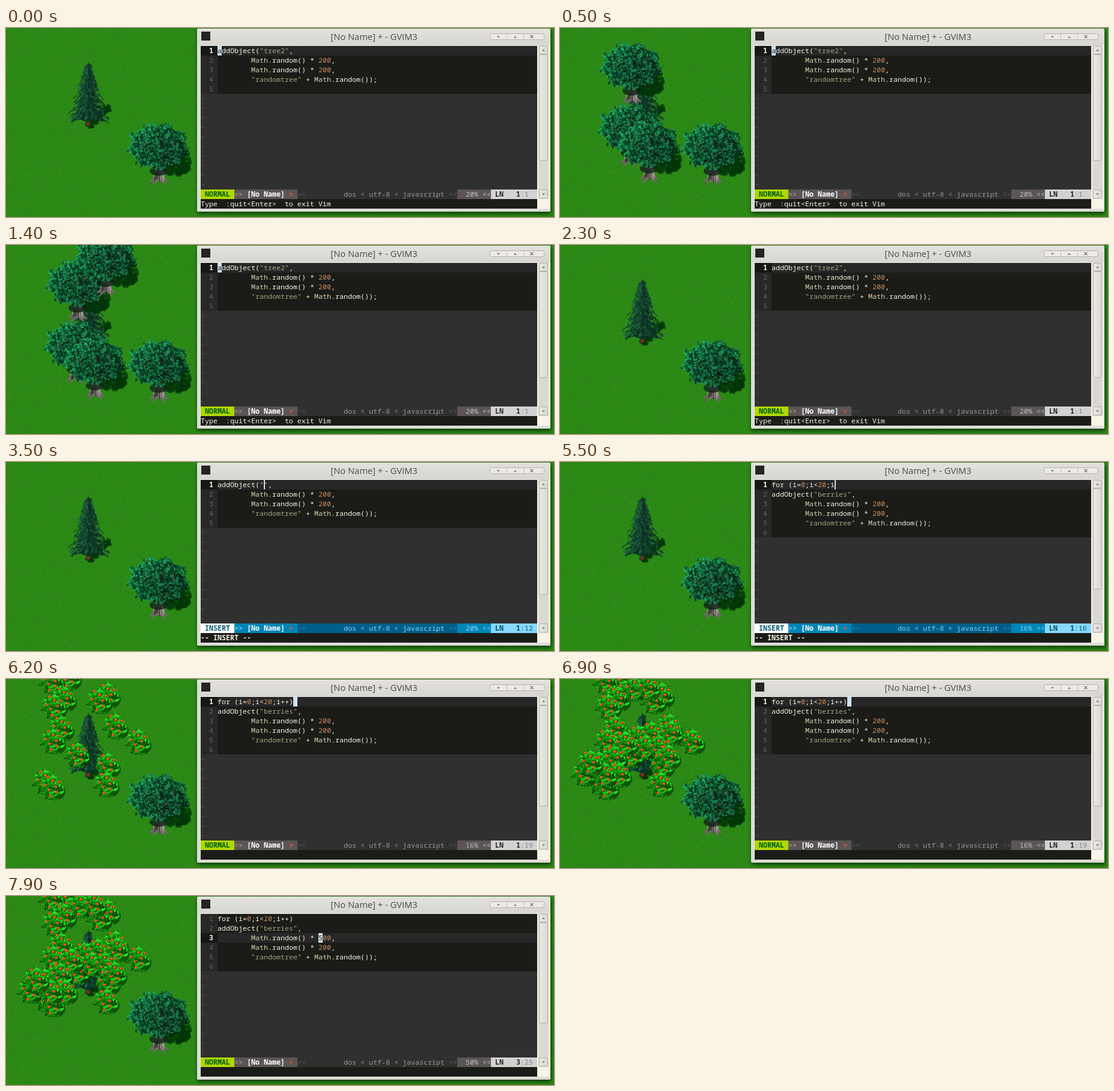
An HTML page with a canvas for the animation above (8 s loop, 912 px wide and 316 px high).

```html
<!DOCTYPE html>
<html lang="en">
<head>
<meta charset="utf-8">
<title>Live code editing</title>
<style>
  html, body { margin: 0; width: 100%; height: 100%; overflow: hidden; background: #2b8413; }
  canvas, svg { position: absolute; left: 0; top: 0; display: block; }
  .code text { font: 11.667px "Noto Sans Mono", monospace; white-space: pre; }
  .code .b { font-weight: 700; }
  .title { font: 14.7px "Open Sans", sans-serif; }
</style>
</head>
<body>
<canvas id="field" width="912" height="316"></canvas>
<svg id="win" width="912" height="316" viewBox="0 0 912 316">
  <defs>
    <filter id="shade" x="-5%" y="-5%" width="110%" height="112%">
      <feDropShadow dx="1" dy="3" stdDeviation="3" flood-color="#001800" flood-opacity=".7"/>
    </filter>
    <linearGradient id="bar" x2="0" y2="1">
      <stop offset="0" stop-color="#e3e1dc"/><stop offset="1" stop-color="#d8d6d0"/>
    </linearGradient>
    <linearGradient id="thumb">
      <stop offset="0" stop-color="#ebe9e5"/><stop offset="1" stop-color="#dcd9d3"/>
    </linearGradient>
  </defs>
  <rect x="318" y="1" width="588" height="306" rx="2" fill="#dcdad5" filter="url(#shade)"/>
  <rect x="318.5" y="1.5" width="587" height="305" rx="2" fill="none" stroke="#e9e8e4"/>
  <rect x="319" y="2" width="586" height="26" fill="url(#bar)"/>
  <rect x="325" y="6" width="15" height="15" fill="#242424"/>
  <text class="title" x="612.5" y="20" text-anchor="middle" fill="#4a4a48">[No Name] + - GVIM3</text>
  <rect x="805.5" y="9.5" width="90" height="10" rx="2" fill="#eceae6" stroke="#b5b2aa"/>
  <path d="M833.5 10v9M861.5 10v9" stroke="#c2bfb8"/>
  <path d="M817 13.500h5l-2.500 3zM845 16.500h5l-2.500-3z" fill="#777"/>
  <path d="M872.500 12l5 5m0-5l-5 5" stroke="#777" stroke-width="1.200"/>
  <rect x="323" y="29" width="582" height="274" fill="#e6e4df"/>
  <rect x="884" y="29" width="20" height="273" fill="#f8f5e6"/>
  <rect x="886" y="29" width="17" height="257" fill="#dad8d2"/>
  <g fill="url(#thumb)" stroke="#b3b0a9">
    <rect x="887.500" y="30.500" width="14" height="13" rx="1"/>
    <rect id="grip" x="887.500" y="44.500" width="14" height="177" rx="1"/>
    <rect x="887.500" y="270.500" width="14" height="14" rx="1"/>
  </g>
  <path d="M892 38.500h5l-2.500-3zM892 276.500h5l-2.500 3z" fill="#777"/>
  <g id="view" class="code"></g>
</svg>
<script>
const LOOP = 8000, LEFT = 352, TOP = 30, CW = 7, RH = 16;
const FOR = 'for (i=0;i<20;i++) ';

/* ---------- scenery ---------- */
function seeded(seed) {
  return () => {
    seed = seed + 0x6D2B79F5 | 0;
    let n = Math.imul(seed ^ seed >>> 15, 1 | seed);
    n = n + Math.imul(n ^ n >>> 7, 61 | n) ^ n;
    return ((n ^ n >>> 14) >>> 0) / 4294967296;
  };
}

function sprite(w, h, paint) {
  const cv = document.createElement('canvas');
  cv.width = w; cv.height = h;
  paint(cv.getContext('2d'), w, h);
  return cv;
}

function blob(c, x, y, rx, ry, fill, turn = 0) {
  c.fillStyle = fill;
  c.beginPath();
  c.ellipse(x, y, rx, ry, turn, 0, 7);
  c.fill();
}

function trace(c, pts) {
  c.beginPath();
  pts.forEach(([x, y]) => c.lineTo(x, y));
}

function line(c, pts, color, width) {
  c.strokeStyle = color;
  c.lineWidth = width;
  trace(c, pts);
  c.stroke();
}

function shape(c, pts, color) {
  c.fillStyle = color;
  trace(c, pts);
  c.fill();
}

const grass = sprite(912, 316, (c, w, h) => {
  const rnd = seeded(4);
  c.fillStyle = '#2c8916';
  c.fillRect(0, 0, w, h);
  for (let i = 0; i < 60000; i++) {
    c.fillStyle = `hsla(${106 + rnd() * 6},73%,${25 + rnd() * 11}%,.5)`;
    c.fillRect(rnd() * w | 0, rnd() * h | 0, 1 + rnd() * 2 | 0, 1);
  }
});

const fir = sprite(84, 112, c => {
  const rnd = seeded(11);
  for (let i = 0; i < 90; i++) {
    const k = rnd();
    blob(c, 42 + k * 34 - rnd() * 8, 104 - k * 32 + rnd() * 10, 4, 2.5, 'rgba(3,56,8,.8)', .5);
  }
  line(c, [[39, 95], [39, 107]], '#7c2a2c', 6);
  for (let i = 0; i < 9; i++) {
    const y = 6 + i * 10, r = 5 + i * 3.6;
    shape(c, [[39, y - 6], [39 + r * .6, y + 6], [39 + r * .9, y + 15], [39 + r * .4, y + 11], [39, y + 16],
      [39 - r * .4, y + 11], [39 - r * .9, y + 15], [39 - r * .6, y + 6]], '#0a3423');
  }
  for (let y = 4; y < 94; y += 1.5) {
    const reach = 2 + y * .4 * (.65 + .35 * (y % 11) / 11);
    for (let i = 0; i < 9; i++) {
      const side = rnd() < .5 ? -1 : 1, a = rnd() * reach, x = 39 + side * a;
      const l = 9 + rnd() * 17 + (side < 0 ? 4 : 0), drop = y + a * .22;
      line(c, [[x, drop], [x + side * (1 + rnd() * 3), drop + 2 + rnd() * 4]],
        `hsl(${146 + rnd() * 12},${42 + rnd() * 16}%,${l}%)`, 1.3);
    }
  }
});

const oak = sprite(114, 114, c => {
  const rnd = seeded(23);
  for (let i = 0; i < 160; i++) {
    const a = rnd() * 6.3, r = Math.sqrt(rnd());
    blob(c, 81 + Math.cos(a) * r * 26, 68 + Math.sin(a) * r * 22, 4, 3, 'rgba(3,54,8,.75)', a);
  }
  shape(c, [[45, 76], [62, 76], [63, 94], [70, 102], [62, 101], [66, 109], [57, 102], [53, 99], [49, 102],
    [41, 109], [45, 100], [36, 102], [46, 92]], '#6f6863');
  for (let i = 0; i < 16; i++) {
    const x = 46 + rnd() * 15, lean = (x - 53.5) * .35;
    line(c, [[x, 84 + rnd() * 6], [x + lean, 93 + rnd() * 9]], rnd() < .5 ? '#aaa39c' : '#38322f', 1.2);
  }
  blob(c, 53, 83, 15, 8, 'rgba(12,30,20,.75)');
  blob(c, 52, 42, 45, 34, '#08351f');
  for (let i = 0; i < 850; i++) {
    const a = rnd() * 6.3, r = Math.sqrt(rnd()) * (1 + .07 * Math.sin(a * 9));
    const dx = Math.cos(a) * r, dy = Math.sin(a) * r;
    const l = 20 - dx * 5 - dy * 4 + r * 4 + (rnd() - .5) * 30;
    blob(c, 52 + dx * 49, 42 + dy * 38, 2.7, 1.3,
      `hsl(${144 + rnd() * 10},${58 + rnd() * 18}%,${Math.max(7, l)}%)`, rnd() * 3);
    if (i % 40 === 0) {
      const x = 52 + dx * 30, y = 42 + dy * 25;
      line(c, [[x, y], [x + 3, y + 3], [x + 3, y + 7]], '#504843', 1.4);
    }
  }
});

const bush = sprite(50, 54, c => {
  const rnd = seeded(37);
  blob(c, 27, 32, 17, 15, 'rgba(5,62,8,.7)');
  blob(c, 22, 25, 15, 17, '#0b5a0e');
  for (let i = 0; i < 190; i++) {
    const a = rnd() * 6.3, r = Math.sqrt(rnd()) * (1 + .14 * Math.sin(a * 7));
    const dy = Math.sin(a) * r;
    blob(c, 22 + Math.cos(a) * r * 18, 25 + dy * 20, 2.9, 1.1,
      `hsl(${113 + rnd() * 10},${72 + rnd() * 16}%,${34 - dy * 5 + (rnd() - .5) * 42}%)`, rnd() * 3);
  }
  for (let i = 0; i < 8; i++) {
    const a = i * 2.4, r = 6 + i * 1.4;
    const x = 22 + Math.cos(a) * r, y = 24 + Math.sin(a) * r * 1.1;
    blob(c, x, y, 2.5, 2.3, '#dc3a12');
    blob(c, x - .5, y - .6, 1.2, 1, '#ff7d4a');
  }
});

// trunk feet of the oaks, centres of the bushes, in planting order
const OAKS = [[119, 131], [116, 234], [148, 261], [166, 88]];
const BUSHES = [
  [104, -3], [76, 4], [169, 27], [155, 37], [96, 33], [80, 46], [182, 79], [220, 105],
  [92, 82], [78, 104], [119, 127], [169, 144], [167, 176], [65, 172], [77, 181],
  [124, 16], [146, 14], [130, 98], [152, 92], [184, 90], [142, 114], [164, 114],
  [180, 130], [108, 108], [64, 142], [40, 158], [90, 132], [98, 160], [74, 160], [50, 140]
];

const field = document.getElementById('field').getContext('2d');
let planted = '';
function drawField(oaks, bushes) {
  const key = oaks + '/' + bushes;
  if (key === planted) return;
  planted = key;
  const plantOak = (x, y) => field.drawImage(oak, x - 53, y - 109);
  field.drawImage(grass, 0, 0);
  field.drawImage(fir, 98, 56);
  plantOak(254, 265);
  OAKS.slice(0, oaks).forEach(p => plantOak(...p));
  BUSHES.slice(0, bushes).forEach(([x, y]) => field.drawImage(bush, x - 22, y - 25));
}

/* ---------- editing session ---------- */
const START = {
  insert: false, row: 1, col: 1, name: 'tree2', loop: -1, count: '200',
  keys: '', msg: 'Type  :quit<Enter>  to exit Vim', cursor: true, oaks: 0, bushes: 0
};
const steps = [
  [100, { keys: ',' }], [200, { keys: '', oaks: 1 }], [300, { keys: ',' }],
  [400, { keys: '', oaks: 2 }], [500, { oaks: 3 }], [800, { oaks: 4 }],
  [1100, { keys: ',' }], [1300, { keys: ',r' }], [1400, { keys: '' }],
  [1600, { keys: ',' }], [1700, { keys: ',r' }], [1800, { keys: '', oaks: 0 }],
  [2300, { cursor: false }], [2400, { cursor: true }],
  [2500, { col: 10 }], [2700, { col: 11 }], [2800, { col: 12 }],
  [3100, { keys: 'c' }], [3200, { keys: 'ci' }],
  [3300, { keys: '', insert: true, name: '', msg: '-- INSERT --' }],
  [3400, { cursor: false }], [3500, { cursor: true }],
  ...[2, 4, 5, 7].map((n, i) => [3600 + i * 100, { name: 'berries'.slice(0, n), col: 12 + n }]),
  [4000, { insert: false, col: 18, msg: '' }],
  [4100, { insert: true, col: 1, loop: 0, msg: '-- INSERT --' }],
  ...[[4200, 3], [4300, 5], [4500, 6], [4600, 7], [4700, 9], [4800, 10], [5000, 11], [5100, 12],
    [5400, 14], [5500, 15], [5600, 17], [5700, 18], [5800, 19]]
    .map(([ms, n]) => [ms, { loop: n, col: n + 1 }]),
  [5900, { insert: false, col: 19, msg: '' }], [6000, { keys: ',' }],
  [6100, { keys: '', bushes: 8 }], [6200, { bushes: 15 }],
  [6400, { bushes: 20, cursor: false }], [6500, { bushes: 25 }],
  [6600, { bushes: 30, cursor: true }],
  [6800, { cursor: false }], [6900, { cursor: true }],
  [7300, { row: 2 }], [7400, { row: 3 }], [7500, { col: 20 }], [7600, { col: 23 }],
  [7700, { col: 25 }], [7800, { keys: 'r' }], [7900, { keys: '', count: '500' }]
];

function stateAt(t) {
  const s = { ...START };
  for (const [ms, change] of steps) if (ms <= t) Object.assign(s, change);
  return s;
}

/* ---------- editor ---------- */
const esc = s => s.replace(/&/g, '&amp;').replace(/</g, '&lt;').replace(/>/g, '&gt;');
const box = (x, y, w, h, fill) => `<rect x="${x}" y="${y}" width="${w}" height="${h}" fill="${fill}"/>`;
const text = (x, y, s, fill, bold) =>
  `<text x="${x}" y="${y + 12}" fill="${fill}"${bold ? ' class="b"' : ''}>${esc(s)}</text>`;

function highlight(s, y) {
  let out = '';
  for (const m of s.matchAll(/"[^"]*"|Math|\d+|[^"\dM ]+/g)) {
    const k = m[0];
    const fill = k[0] === '"' ? '#a0a47e' : k === 'Math' ? '#d6d2ad' : /\d/.test(k) ? '#c58b5d' : '#f6f3e0';
    out += text(LEFT + m.index * CW, y, k, fill);
  }
  return out;
}

const NORMAL = {
  mode: '#afd700', modeText: '#005f00', file: '#5c5557', mid: '#303030', info: '#969696',
  dim: '#595959', arrow: '#b5b878', pct: '#5c5557', pctText: '#c4c0c0',
  pos: '#d2d2d2', posText: '#262626', colText: '#858585'
};
const INSERT = {
  mode: '#ffffff', modeText: '#005f70', file: '#0085b5', mid: '#005f8a', info: '#87d0f5',
  dim: '#2b88b0', arrow: '#c8ecff', pct: '#0085b5', pctText: '#87d7ff',
  pos: '#87d7ff', posText: '#004f68', colText: '#005f78'
};

function statusLine(s, total) {
  const p = s.insert ? INSERT : NORMAL, y = 270;
  return box(324, y, 56, RH, p.mode) + box(380, y, 105, RH, p.file) + box(485, y, 266, RH, p.mid) +
    box(751, y, 56, RH, p.pct) + box(807, y, 77, RH, p.pos) +
    text(331, y, s.insert ? 'INSERT' : 'NORMAL', p.modeText, true) +
    text(380, y, '>>', p.arrow) + text(401, y, '[No Name]', '#fff', true) +
    text(471, y, '+', '#e4512b', true) + text(485, y, '>>', p.dim) +
    text(562, y, 'dos < utf-8 < javascript', p.info) + text(737, y, '<<', p.dim) +
    text(765, y, Math.floor(s.row / total * 100) + '%', p.pctText) + text(793, y, '<<', p.pctText) +
    text(814, y, 'LN', p.posText, true) + text(849, y, String(s.row), p.posText, true) +
    text(856, y, ':' + s.col, p.colText);
}

const view = document.getElementById('view'), grip = document.getElementById('grip');
let shown = '';
function drawEditor(s) {
  const lines = [
    `addObject("${s.name}",`,
    `        Math.random() * ${s.count},`,
    '        Math.random() * 200,',
    '        "randomtree" + Math.random());',
    ''
  ];
  if (s.loop >= 0) lines.unshift(FOR.slice(0, s.loop));
  const total = lines.length;
  let out = box(324, TOP, 560, 240, '#303030');
  lines.forEach((l, i) => {
    const y = TOP + i * RH, here = i + 1 === s.row;
    out += box(324, y, 28, RH, here ? '#171717' : '#282828') +
      box(LEFT, y, 532, RH, here ? '#272727' : '#1b1c18') +
      text(338, y, String(i + 1), here ? '#f4f0dc' : '#666', here) + highlight(l, y);
  });
  for (let i = total; i < 15; i++) out += text(324, TOP + i * RH, '~', '#5c5c5c');
  if (s.cursor) {
    const x = LEFT + (s.col - 1) * CW, y = TOP + (s.row - 1) * RH;
    out += box(x, y, s.insert ? 2 : CW, RH, '#c9e1f2');
    if (!s.insert) out += text(x, y, lines[s.row - 1][s.col - 1] || '', '#20242a');
  }
  out += statusLine(s, total) + box(324, 286, 560, RH, '#1b1c18') +
    text(324, 286, s.msg, '#f8f5e2', s.insert) + text(807, 286, s.keys, '#f8f5e2');
  if (out === shown) return;
  shown = out;
  view.innerHTML = out;
  grip.setAttribute('height', s.loop < 0 ? 177 : 168);
}

const began = performance.now();
function frame() {
  const s = stateAt((performance.now() - began) % LOOP);
  drawField(s.oaks, s.bushes);
  drawEditor(s);
  requestAnimationFrame(frame);
}
frame();
</script>
</body>
</html>
```
